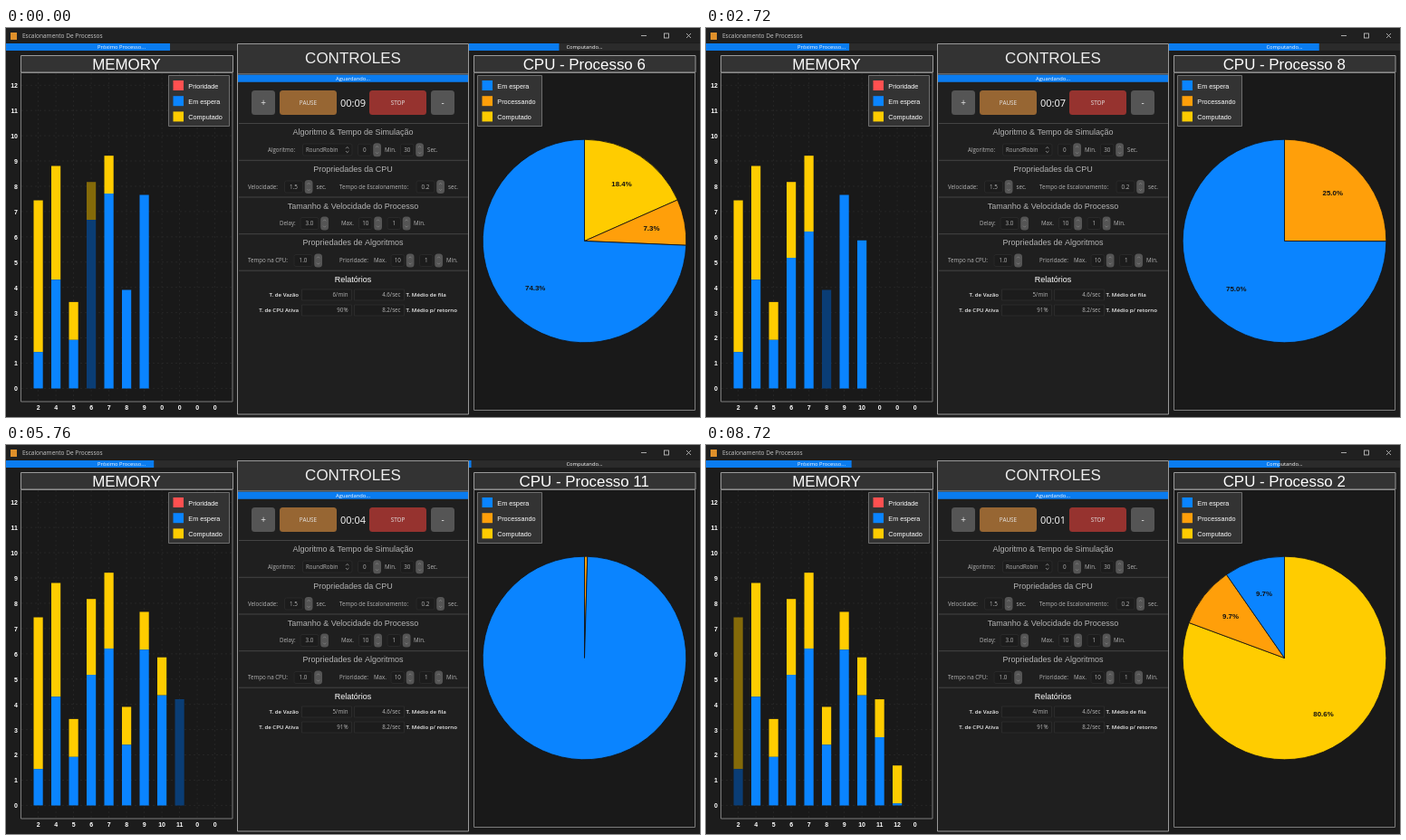
These frames come from a looping animation (766 by 430 pixels, 8800 ms). An HTML page with a canvas:

```html
<!DOCTYPE html>
<html lang="pt">
<head>
<meta charset="utf-8">
<title>Escalonamento De Processos</title>
<style>
html, body { margin: 0; height: 100%; overflow: hidden; background: #1c1c1c; }
canvas { display: block; }
</style>
</head>
<body>
<canvas id="stage" width="766" height="430"></canvas>
<script>
const ctx = document.getElementById('stage').getContext('2d');
const LOOP = 8800, STEP = 80;
const ARIAL = '"Liberation Sans", Arial, sans-serif', UI = '"Open Sans", sans-serif';
const BLUE = '#0a84ff', YELLOW = '#ffcc00', ORANGE = '#ff9f0a', RED = '#ff5050';
const DIM_BLUE = '#0a3d75', DIM_YELLOW = '#846a09';
const PANEL = '#191919', HEAD = '#333', EDGE = '#9a9a9a', GREY = '#b4b4b4';

// Each run on the CPU takes one second and computes QUANTUM units.
const RUN = 1000, QUANTUM = 1.5;
const ARRIVAL = 2985, ARRIVAL_TIME = 2965, FIRST_ARRIVAL = 875;
const processes = [
  { id: 2, size: 7.44, done: 6, start: 8239 },
  { id: 4, size: 8.8, done: 4.5 },
  { id: 5, size: 3.42, done: 1.5 },
  { id: 6, size: 8.17, done: 1.5, start: -398 },
  { id: 7, size: 9.21, done: 1.5, start: 838 },
  { id: 8, size: 3.9, done: 0, start: 2069 },
  { id: 9, size: 7.66, done: 0, start: 3289 },
  { id: 10, size: 5.86, done: 0, start: 4518 },
  { id: 11, size: 4.2, done: 0, start: 5747 },
  { id: 12, size: 1.58, done: 0, start: 6969, lag: 0.02 }
];

function rect(x, y, w, h, fill, stroke, radius = 0) {
  ctx.beginPath();
  ctx.roundRect(x, y, w, h, radius);
  if (fill) { ctx.fillStyle = fill; ctx.fill(); }
  if (stroke) { ctx.strokeStyle = stroke; ctx.lineWidth = 1; ctx.stroke(); }
}

function line(color, width, ...points) {
  ctx.beginPath();
  points.forEach(([x, y], i) => i ? ctx.lineTo(x, y) : ctx.moveTo(x, y));
  ctx.strokeStyle = color;
  ctx.lineWidth = width;
  ctx.stroke();
}

// y is the middle of the capitals
function text(str, x, y, size, { color = '#fff', align = 'left', font = UI, weight = 400 } = {}) {
  ctx.font = `${weight} ${size}px ${font}`;
  ctx.textAlign = align;
  ctx.fillStyle = color;
  ctx.fillText(str, x, y + size * 0.36);
}

function progress(x, y, w, part, label) {
  rect(x, y, w, 8, '#2b2b2b');
  rect(x, y, w * part, 8, '#0a7cf0');
  text(label, x + w / 2, y + 4, 5.8, { align: 'center' });
}

function header(str, x, w) {
  rect(x + 0.5, 30.5, w, 18.5, HEAD, EDGE);
  text(str, x + w / 2, 40, 16.9, { align: 'center', font: ARIAL });
}

function legend(x, w, entries) {
  rect(x + 0.5, 52.5, w, 56, HEAD, '#6e6e6e');
  entries.forEach(([color, label], i) => {
    const y = 63.5 + i * 17.2;
    rect(x + 5.5, y - 5.5, 11.5, 11, color);
    text(label, x + 22.3, y + 0.4, 7.25, { font: ARIAL });
  });
}

function titleBar() {
  rect(0, 0, 766, 16, '#202020');
  rect(5, 5, 7, 8, '#e0902a');
  text('Escalonamento De Processos', 18, 8.8, 6.5, { color: '#c8c8c8' });
  line('#ccc', 0.8, [701, 8.5], [707, 8.5]);
  ctx.strokeRect(726.5, 6, 5, 5);
  line('#ccc', 0.8, [751, 6], [756, 11]);
  line('#ccc', 0.8, [756, 6], [751, 11]);
}

function memory(t, running) {
  const count = 7 + Math.floor((t - FIRST_ARRIVAL + ARRIVAL) / ARRIVAL);
  const elapsed = (t - FIRST_ARRIVAL + ARRIVAL) % ARRIVAL;
  progress(0, 17, 255, Math.min(1, Math.round(elapsed / ARRIVAL_TIME * 100) / 100), 'Próximo Processo...');
  rect(16.5, 49.5, 233.5, 363.5, PANEL, '#7d7d7d');
  header('MEMORY', 16, 234);

  const unit = 27.93, base = 398.4, slotX = i => 35.6 + i * 19.5;
  const label = { align: 'center', font: ARIAL, weight: 700 };
  ctx.setLineDash([2, 3]);
  for (let n = 0; n <= 12; n++) line('#2b2b2b', 0.7, [17, base - n * unit], [249, base - n * unit]);
  for (let i = 0; i < 11; i++) line('#2b2b2b', 0.7, [slotX(i), 50], [slotX(i), 412]);
  ctx.setLineDash([]);
  for (let n = 0; n <= 12; n++) text(n, 13, base - n * unit + 0.4, 7, { ...label, align: 'right' });

  for (let i = 0; i < 11; i++) {
    const p = i < count && processes[i];
    text(p ? p.id : 0, slotX(i), 419.7, 7, label);
    if (!p) continue;
    const done = p.done + (t >= p.start + RUN ? QUANTUM : 0);
    const active = p === running && t < p.start + RUN;
    const top = base - p.size * unit, split = top + done * unit, x = slotX(i) - 5.1;
    rect(x, top, 10.2, split - top, active ? DIM_YELLOW : YELLOW);
    rect(x, split, 10.2, base - split, active ? DIM_BLUE : BLUE);
  }
  legend(179, 67, [[RED, 'Prioridade'], [BLUE, 'Em espera'], [YELLOW, 'Computado']]);
}

function cpu(t, p) {
  const part = Math.min(1, (t - p.start) / RUN);
  progress(511, 17, 255, Math.floor(part * 100) / 100, 'Computando...');
  rect(516.5, 49.5, 244, 373, PANEL, '#7d7d7d');
  header('CPU - Processo ' + p.id, 516, 244.5);

  const cx = 638.5, cy = 235.5, r = 112.3;
  const current = Math.max(0, part - (p.lag || 0)) * QUANTUM;
  const slices = [[p.done, YELLOW], [current, ORANGE], [p.size - p.done - current, BLUE]];
  const labels = [];
  let angle = -Math.PI / 2;
  for (const [value, color] of slices) {
    if (value <= 0) continue;
    const share = value / p.size, sweep = share * 2 * Math.PI, mid = angle + sweep / 2;
    ctx.beginPath();
    ctx.moveTo(cx, cy);
    ctx.arc(cx, cy, r, angle, angle + sweep);
    ctx.closePath();
    ctx.fillStyle = color;
    ctx.fill();
    ctx.strokeStyle = '#111';
    ctx.lineWidth = 0.8;
    ctx.stroke();
    labels.push([(share * 100).toFixed(1) + '%', cx + Math.cos(mid) * r * 0.67, cy + Math.sin(mid) * r * 0.67]);
    angle += sweep;
  }
  if (part >= 0.02) {
    for (const [str, x, y] of labels)
      text(str, x, y, 7.9, { color: '#111', align: 'center', font: ARIAL, weight: 700 });
  }
  legend(520, 71, [[BLUE, 'Em espera'], [ORANGE, 'Processando'], [YELLOW, 'Computado']]);
}

function button(x, w, color, label, size) {
  rect(x, 69, w, 27, color, null, 3.5);
  text(label, x + w / 2, 82.7, size, { color: '#e6e6e6', align: 'center' });
}

function field(x, y, w, value) {
  rect(x + 0.5, y - 6.5, w, 13, '#1c1c1c', '#292929', 2);
  text(value, x + w / 2 + 0.5, y, 6.3, { color: GREY, align: 'center' });
}

function spinner(x, y, w, value) {
  field(x, y, w, value);
  const px = x + w + 2.7, cx = px + 4.4;
  rect(px, y - 7.5, 8.8, 15, '#555', null, 3.5);
  line('#8a8a8a', 0.7, [cx - 1.6, y - 2.6], [cx, y - 4.2], [cx + 1.6, y - 2.6]);
  line('#8a8a8a', 0.7, [cx - 1.6, y + 2.6], [cx, y + 4.2], [cx + 1.6, y + 2.6]);
}

function section(str, y, color = GREY) {
  line('#444', 1, [257, y - 9.5], [510, y - 9.5]);
  text(str, 383, y, 9, { color, align: 'center', font: ARIAL });
}

function report(y, left, a, b, right) {
  const bold = { weight: 600, color: '#eee' }, value = { color: GREY, align: 'right' };
  text(left, 323, y, 6.1, { ...bold, align: 'right' });
  rect(326.5, y - 6, 55, 12, '#1c1c1c', '#2b2b2b');
  rect(384.5, y - 6, 55, 12, '#1c1c1c', '#2b2b2b');
  text(a, 377.5, y, 6.2, value);
  text(b, 435.5, y, 6.2, value);
  text(right, 441.5, y, 6.1, bold);
}

function controls(t) {
  const note = (str, x, y) => text(str, x, y, 6.2, { color: GREY });
  rect(255.5, 17.5, 255, 409.5, '#1f1f1f', EDGE);
  rect(256, 18, 254, 33, HEAD);
  text('CONTROLES', 383, 32.7, 17, { color: '#eee', align: 'center', font: ARIAL });
  line(EDGE, 1, [256, 51], [510, 51]);
  progress(256, 51.7, 254, 1, 'Aguardando...');

  button(271, 26, '#555', '+', 10);
  button(302, 63, '#976633', 'PAUSE', 6.4);
  button(401, 63, '#96332f', 'STOP', 6.4);
  button(469, 26, '#555', '-', 10);
  text('00:0' + Math.floor(9.88 - t / 1000), 383, 82.7, 11, { align: 'center' });

  section('Algoritmo & Tempo de Simulação', 115);
  note('Algoritmo:', 289, 134.7);
  rect(327.5, 128, 54.5, 13, '#1c1c1c', '#292929', 2);
  note('RoundRobin', 331, 134.7);
  line(GREY, 0.7, [375, 133.2], [376.7, 131.5], [378.4, 133.2]);
  line(GREY, 0.7, [375, 136], [376.7, 137.7], [378.4, 136]);
  spinner(388, 134.7, 14.5, '0');
  note('Min.', 418, 134.7);
  spinner(435, 134.7, 14.5, '30');
  note('Sec.', 465, 134.7);

  section('Propriedades da CPU', 155.8);
  note('Velocidade:', 267, 175.5);
  spinner(307, 175.5, 20, '1.5');
  note('sec.', 342.5, 175.5);
  note('Tempo de Escalonamento:', 368, 175.5);
  spinner(452.5, 175.5, 20, '0.2');
  note('sec.', 488, 175.5);

  section('Tamanho & Velocidade do Processo', 196.5);
  note('Delay:', 302, 216);
  spinner(324.5, 216, 20, '3.0');
  note('Max.', 370, 216);
  spinner(389, 216, 14.5, '10');
  spinner(420.5, 216, 14.5, '1');
  note('Min.', 450, 216);

  section('Propriedades de Algoritmos', 237.2);
  note('Tempo na CPU:', 267, 257);
  spinner(317.5, 257, 20, '1.0');
  note('Prioridade:', 368, 257);
  note('Max.', 406, 257);
  spinner(424.5, 257, 14.5, '10');
  spinner(456, 257, 14.5, '1');
  note('Min.', 486, 257);

  section('Relatórios', 277.7, '#fff');
  const rate = t < 602 ? 6 : t < 6747 ? 5 : 4;
  report(295, 'T. de Vazão', rate + '/min', '4.6/sec', 'T. Médio de fila');
  report(312, 'T. de CPU Ativa', (t < 602 ? 90 : 91) + '%', '8.2/sec', 'T. Médio p/ retorno');
}

function draw(t) {
  const running = processes.filter(p => p.start <= t).sort((a, b) => b.start - a.start)[0];
  rect(0, 0, 766, 430, '#1c1c1c');
  titleBar();
  memory(t, running);
  cpu(t, running);
  controls(t);
}

function tick() {
  const t = performance.now() % LOOP;
  draw(Math.floor(t / STEP) * STEP);
  requestAnimationFrame(tick);
}
tick();
</script>
</body>
</html>
```
